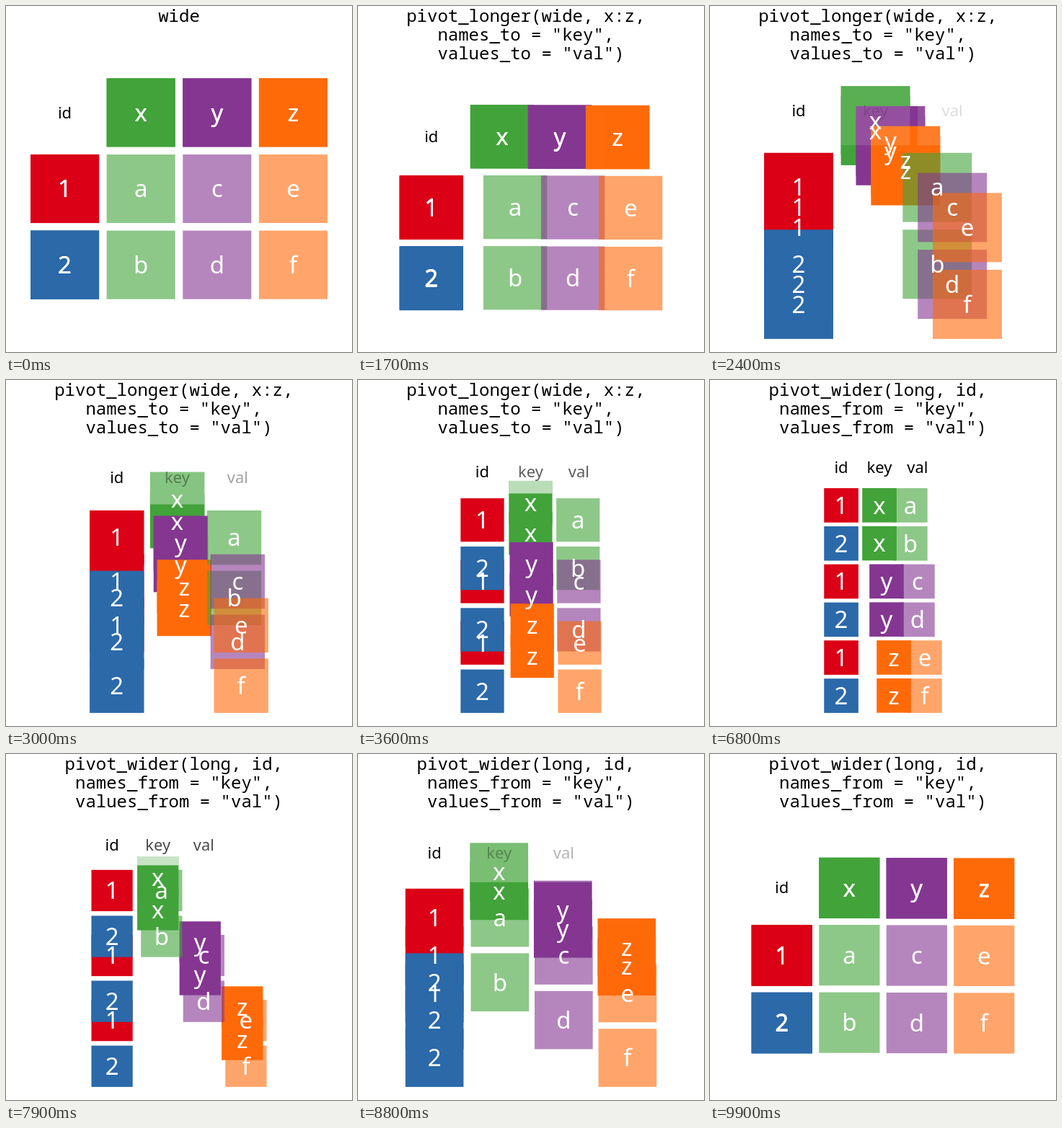
Animation of 480 by 480 pixels, one loop 10 s. Source, as an HTML page:

```html
<!DOCTYPE html>
<html lang="en">
<head>
<meta charset="utf-8">
<title>Wide and long tables</title>
<style>
  html, body { margin: 0; width: 100%; height: 100%; overflow: hidden; background: #fff; }
  svg { display: block; width: 100%; height: 100%; }
  .cell, .head { font-family: "Noto Sans", "Open Sans", sans-serif; text-anchor: middle; }
  .cell { font-size: 33px; fill: #fff; }
  .head { font-size: 22px; fill: #000; }
  .title { font-family: "Noto Sans Mono", "DejaVu Sans Mono", monospace; font-size: 24px; white-space: pre; }
</style>
</head>
<body>
<svg id="stage" viewBox="0 0 480 480">
  <g id="tiles"></g>
  <g id="labels"></g>
  <g id="titles"></g>
</svg>
<script>
const STEP = 100, FRAMES = 100;
const TILE = 0.9;
const TO_LONG = { start: 16, length: 34 };
const TO_WIDE = { start: 67, length: 33 };
const RED = '#db0016', BLUE = '#2b69a9';
const KEYS = [['x', '#41a339'], ['y', '#843691'], ['z', '#ff6a09']];
const VALUES = 'abcdef';

const titles = {
  still: ['wide'],
  longer: ['pivot_longer(wide, x:z, ', '   names_to = "key", ', '   values_to = "val")'],
  wider: ['pivot_wider(long, id, ', ' names_from = "key", ', ' values_from = "val")']
};

function add(parent, tag, attrs, text) {
  const el = document.createElementNS('http://www.w3.org/2000/svg', tag);
  for (const name in attrs) el.setAttribute(name, attrs[name]);
  if (text) el.textContent = text;
  return parent.appendChild(el);
}

const byId = id => document.getElementById(id);
const mix = (a, b, k) => a + (b - a) * k;

// Each cell holds its [column, row] in the wide and in the long table.
const cells = [];

function addCell(text, fill, wide, long, alpha = 1) {
  cells.push({
    wide, long,
    tile: add(byId('tiles'), 'rect', { fill, 'fill-opacity': alpha }),
    label: add(byId('labels'), 'text', { class: 'cell' }, text),
    drop: 11.8
  });
}

function addHead(text, col, fades) {
  cells.push({
    wide: [col, 0], long: [col, 0], fades,
    tile: add(byId('tiles'), 'rect', { fill: '#fff' }),
    label: add(byId('labels'), 'text', { class: 'head' }, text),
    drop: 7.9
  });
}

[RED, BLUE].forEach((fill, i) => {
  for (let k = 0; k < 3; k++) addCell(String(i + 1), fill, [0, i + 1], [0, 2 * k + i + 1]);
});
KEYS.forEach(([name, fill], k) => {
  for (let i = 0; i < 2; i++) addCell(name, fill, [k + 1, 0], [1, 2 * k + i + 1]);
});
KEYS.forEach(([, fill], k) => {
  for (let i = 0; i < 2; i++) {
    addCell(VALUES[2 * k + i], fill, [k + 1, i + 1], [2, 2 * k + i + 1], 0.6);
  }
});
addHead('id', 0, false);
addHead('key', 1, true);
addHead('val', 2, true);

const titleGroups = {};
for (const name in titles) {
  const lines = titles[name];
  const group = titleGroups[name] = add(byId('titles'), 'g', {});
  const left = 240 - lines[0].length * 7.2;
  lines.forEach((line, i) => add(group, 'text', { class: 'title', x: left, y: 22 + 26 * i }, line));
}

const sineInOut = p => (1 - Math.cos(Math.PI * p)) / 2;
const expoOut = p => p >= 1 ? 1 : 1 - 2 ** (-10 * p);

// Shares of the long layout along x and y, plus the title in view.
function poseAt(frame) {
  const longer = (frame - TO_LONG.start) / TO_LONG.length;
  const wider = (frame - TO_WIDE.start) / TO_WIDE.length;
  if (longer <= 0) return { kx: 0, ky: 0, title: 'still' };
  if (longer <= 1) return { kx: expoOut(longer), ky: sineInOut(longer), title: 'longer' };
  if (wider <= 0) return { kx: 1, ky: 1, title: 'still' };
  return { kx: 1 - expoOut(wider), ky: 1 - sineInOut(wider), title: 'wider' };
}

function draw(frame) {
  const { kx, ky, title } = poseAt(frame);
  for (const name in titleGroups) {
    titleGroups[name].setAttribute('visibility', name === title ? 'visible' : 'hidden');
  }

  // The view always fits the whole table into a square below the title.
  const extra = (titles[title].length - 1) * 26;
  const size = 412 - extra / 1.1;
  const midY = 253.5 + extra / 2;
  const spots = cells.map(c => [mix(c.wide[0], c.long[0], kx), mix(c.wide[1], c.long[1], ky)]);
  const maxCol = Math.max(...spots.map(s => s[0]));
  const maxRow = Math.max(...spots.map(s => s[1]));
  const unit = size / (Math.max(maxCol, maxRow) + TILE);
  const side = unit * TILE;

  cells.forEach((c, i) => {
    const x = 240 + (spots[i][0] - maxCol / 2) * unit;
    const y = midY + (spots[i][1] - maxRow / 2) * unit;
    c.tile.setAttribute('x', x - side / 2);
    c.tile.setAttribute('y', y - side / 2);
    c.tile.setAttribute('width', side);
    c.tile.setAttribute('height', side);
    c.label.setAttribute('x', x);
    c.label.setAttribute('y', y + c.drop);
    if (c.fades) {
      c.tile.setAttribute('opacity', ky);
      c.label.setAttribute('opacity', ky);
    }
  });
}

const begin = performance.now();
let shown = -1;

function tick() {
  const frame = Math.floor((performance.now() - begin) / STEP) % FRAMES;
  if (frame !== shown) draw(shown = frame);
  requestAnimationFrame(tick);
}
tick();
</script>
</body>
</html>
```
